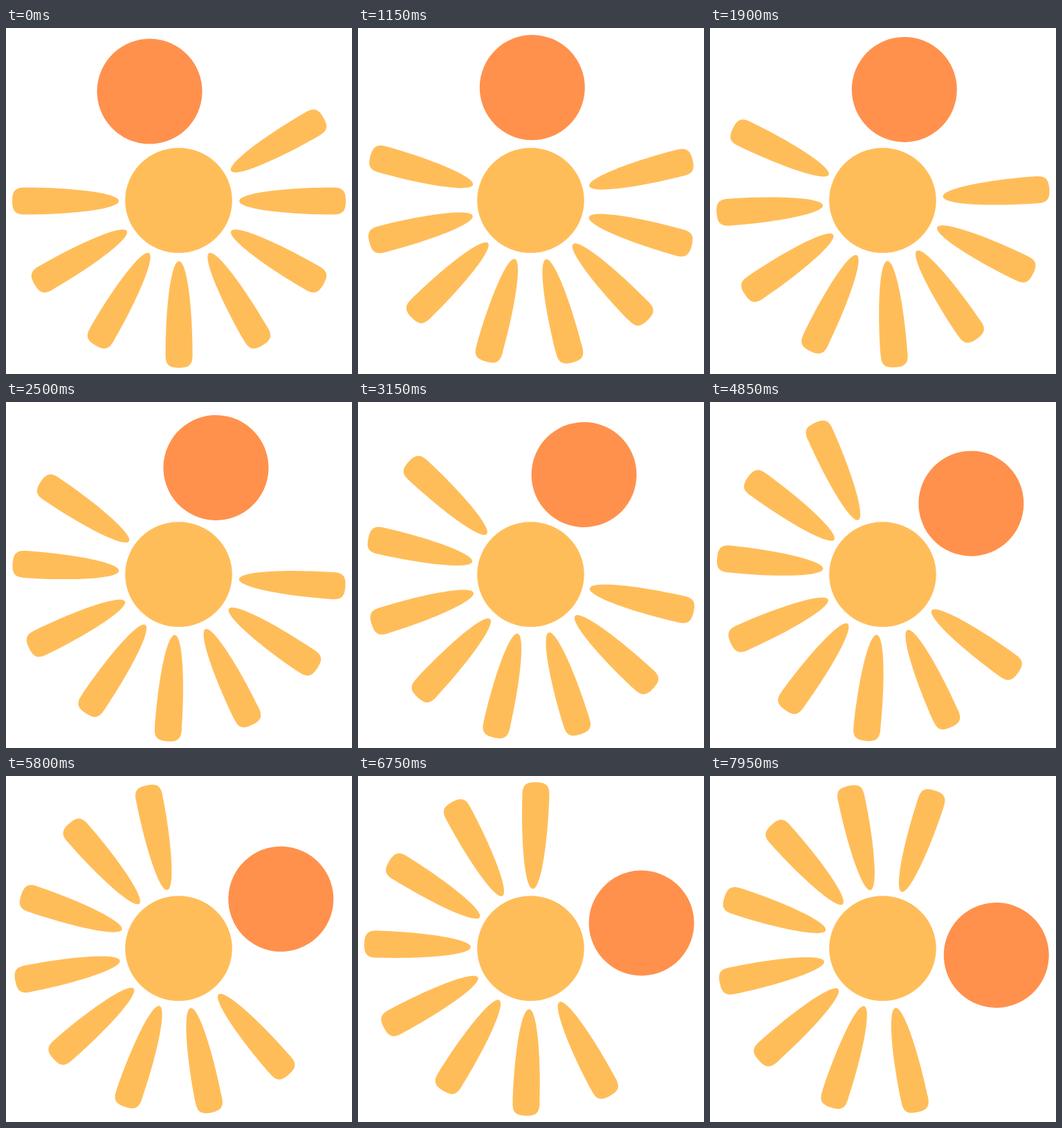
Animation, 500 px wide and 500 px high, one loop 8000 ms. Source, as an HTML page with a canvas:

```html
<!DOCTYPE html>
<html lang="en">
<head>
<meta charset="utf-8">
<title>Turning sun</title>
<style>
  html, body { margin: 0; width: 100%; height: 100%; overflow: hidden; background: #fff; }
  canvas { display: block; width: 100vmin; height: 100vmin; }
</style>
</head>
<body>
<canvas id="stage" width="500" height="500"></canvas>
<script>
const ctx = document.getElementById('stage').getContext('2d');
const YELLOW = '#ffbd59', ORANGE = '#ff914d';
const LOOP = 8000, STEP = 50, DEG_PER_MS = 0.0136;
const rad = deg => deg * Math.PI / 180;

// One ray pointing up from the hub: a rounded tip, full sides, a blunt end.
const ray = new Path2D(
  'M0-87C11.5-87 19.5-153 19.5-223C19.5-237 14-241 0-241' +
  'C-14-241-19.5-237-19.5-223C-19.5-153-11.5-87 0-87Z');

function ellipse(x, y, rx, ry, color) {
  ctx.fillStyle = color;
  ctx.beginPath();
  ctx.ellipse(x, y, rx, ry, 0, 0, 2 * Math.PI);
  ctx.fill();
}

function turned(deg, paint) {
  ctx.save();
  ctx.rotate(rad(deg));
  paint();
  ctx.restore();
}

function draw(ms) {
  const turn = ms * DEG_PER_MS;
  ctx.fillStyle = '#fff';
  ctx.fillRect(0, 0, 500, 500);
  ellipse(249.5, 249.2, 77.3, 75.9, YELLOW);

  ctx.save();
  ctx.translate(250, 250);
  ctx.fillStyle = YELLOW;
  for (let deg = 60; deg <= 270; deg += 30) {
    turned(deg + turn, () => ctx.fill(ray));
  }
  // Plain disc in place of the lettered rays.
  turned(turn - 15, () => ellipse(0, -164, 76, 76, ORANGE));
  ctx.restore();
}

const start = performance.now();
function tick() {
  const ms = (performance.now() - start) % LOOP;
  draw(Math.floor(ms / STEP) * STEP);
  requestAnimationFrame(tick);
}
tick();
</script>
</body>
</html>
```
